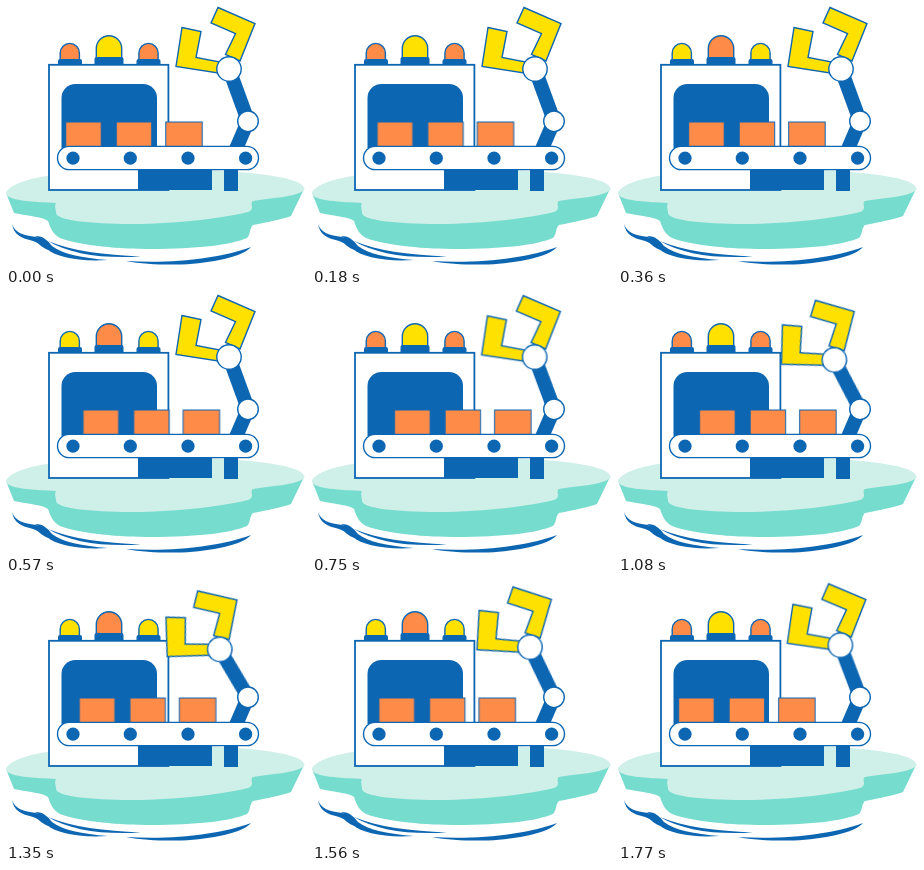
These frames come from a looping animation (300 px wide and 260 px high, 1800 ms). An HTML page:

```html
<!DOCTYPE html>
<html lang="en">
<head>
<meta charset="utf-8">
<title>Conveyor</title>
<style>
  html, body { margin: 0; width: 100%; height: 100%; overflow: hidden; background: #fff; }
  svg { display: block; width: 300px; height: 260px; }

  .blue { fill: #0d66b2; }
  .white { fill: #fff; }
  .yellow { fill: #ffe100; }
  .orange { fill: #ff8b49; }
  .line { stroke: #0d66b2; stroke-width: 1.4; }
  .limb { fill: none; stroke: #0d66b2; stroke-width: 14; }

  .boxes { stroke-width: 1; animation: slide 1.8s linear infinite; }
  .arm { transform-origin: 242px 115px; animation: swing 1.8s linear infinite; }
  .small { animation: blink-small .9s step-end infinite; }
  .big { animation: blink-big .9s step-end infinite; }

  @keyframes slide {
    50% { transform: translateX(27.4px); }
  }
  @keyframes swing {
    0%, 40.8% { transform: rotate(0deg); }
    71.7% { transform: rotate(-12deg); }
    100% { transform: rotate(0deg); }
  }
  @keyframes blink-small {
    0%, 83.3% { fill: #ff8b49; }
    36.6% { fill: #ffe100; }
  }
  @keyframes blink-big {
    0%, 83.3% { fill: #ffe100; }
    36.6% { fill: #ff8b49; }
  }
</style>
</head>
<body>
<svg viewBox="0 0 300 260">
  <!-- island -->
  <path fill="#76dccd" d="M0 187L8 207C22 210 38 211 42 215C44 220 46 228 54 232C75 240 115 243 145 243C190 243 225 239 241 232C245 228 243 223 247 219C262 216 277 213 285 210L298.5 182Z"/>
  <path fill="#cfefe9" d="M0 187C6 172 60 163 150 163C230 163 299 170 298.5 183C295 191 262 192 247 195C243 198 250 203 242 206C222 211 175 218 125 218C84 218 50 214 50 207C50 202 48 201 50 197C30 196 0 195 0 187Z"/>

  <!-- waves -->
  <g class="blue">
    <path d="M6 218C9 227 17 229 30 231C38 233 38 240 44 244C36 243 34 237 27 235C15 232 8 229 6 218Z"/>
    <path d="M29 230C38 230 42 235 46 240C56 248 76 252 102 254C73 256 50 251 41 243C37 239 36 234 29 230Z"/>
    <path d="M42 235C66 245 98 249 135 250.5C98 253 63 248 42 235Z"/>
    <path d="M120 255C168 258 215 252 245 241C237 251 205 257 176 258.5C156 259 136 258 120 255Z"/>
  </g>

  <!-- lamps -->
  <g class="line">
    <path class="small" d="M54.2 54V47a9.6 9.6 0 0 1 19.2 0V54Z"/>
    <path class="big" d="M90.3 53V42.5a12.7 12.7 0 0 1 25.4 0V53Z"/>
    <path class="small" d="M132.9 54V47a9.6 9.6 0 0 1 19.2 0V54Z"/>
  </g>
  <g class="blue">
    <rect x="52" y="53" width="24" height="7" rx="2"/>
    <rect x="88.5" y="51" width="29" height="9" rx="2"/>
    <rect x="130.5" y="53" width="24" height="7" rx="2"/>
  </g>

  <!-- machine -->
  <rect class="white line" x="43" y="58.8" width="119.4" height="125.2" style="stroke-width:1.8"/>
  <path class="blue" d="M55.5 142V92a14 14 0 0 1 14-14H137a14 14 0 0 1 14 14V142Z"/>
  <path class="blue" d="M132 162H206V184H132ZM218 162H232V185H218Z"/>

  <!-- robot -->
  <path class="limb" d="M242 115L230 143"/>
  <g class="arm">
    <path class="limb" d="M223 63L242 115"/>
    <g class="yellow line">
      <path d="M212 1.5L249 17.5L234 55L219.5 48.5L229.5 27.5L205 17Z"/>
      <path d="M176 21.5L195 25.5L190 51.5L214 56L212 67L170 60.5Z"/>
    </g>
    <circle class="white line" cx="223" cy="63" r="12.2"/>
  </g>
  <circle class="white line" cx="242" cy="115.3" r="10.3"/>

  <!-- conveyor -->
  <g class="boxes orange line">
    <rect x="59.7" y="116" width="35.5" height="25"/>
    <rect x="110.2" y="116" width="35.5" height="25"/>
    <rect x="159.7" y="116" width="36.5" height="25"/>
  </g>
  <rect class="white line" x="51.5" y="140.4" width="201" height="23.2" rx="11.6"/>
  <g class="blue">
    <circle cx="67" cy="152.2" r="6.6"/>
    <circle cx="124.3" cy="152.2" r="6.6"/>
    <circle cx="182" cy="152.2" r="6.6"/>
    <circle cx="239.6" cy="152.2" r="6.6"/>
  </g>
</svg>
</body>
</html>
```
